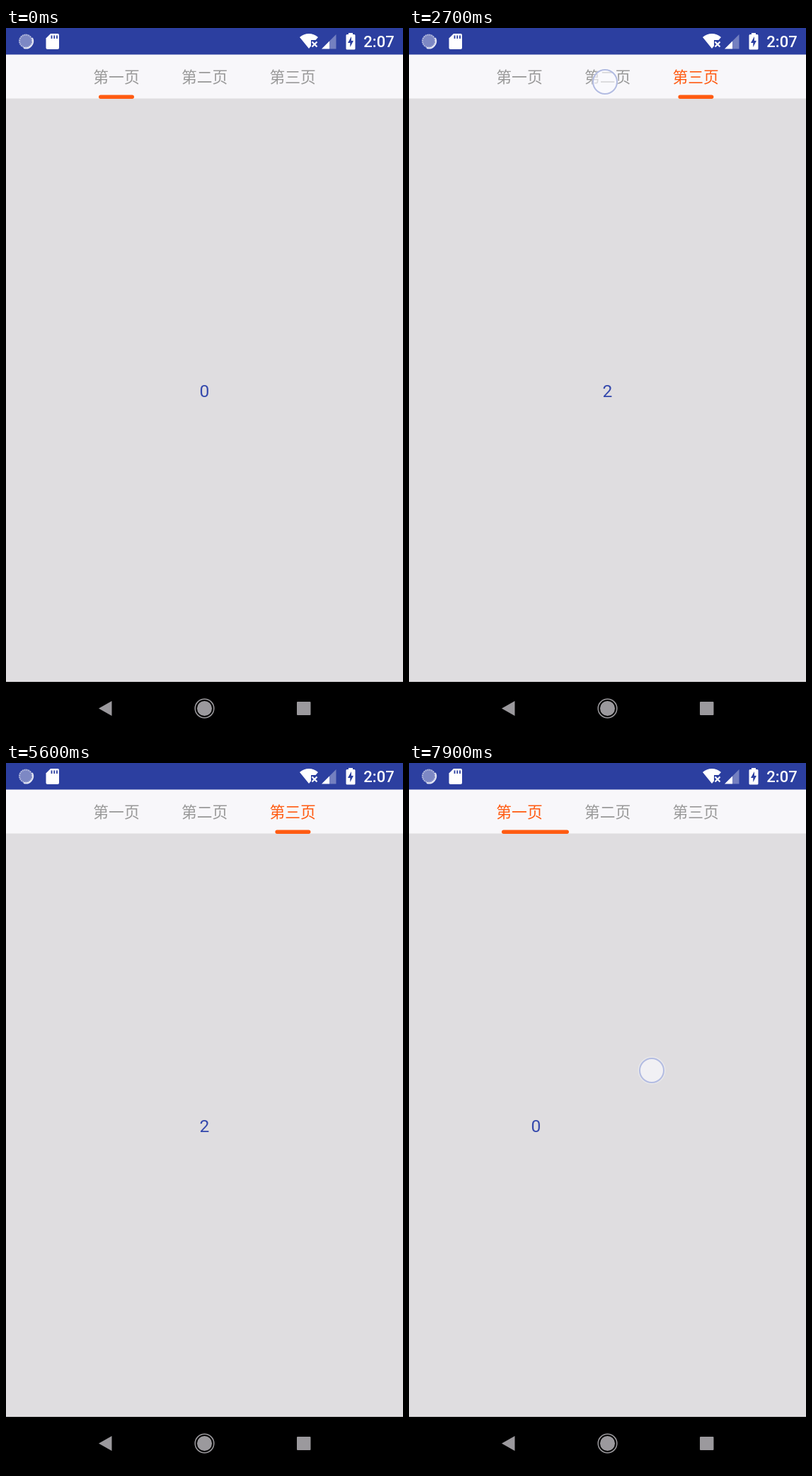
Animation, 561 px wide and 998 px high, one loop 8000 ms. Source, as an HTML page:

```html
<!DOCTYPE html>
<html lang="zh-CN">
<head>
<meta charset="utf-8">
<style>
  html, body { margin: 0; width: 100%; height: 100%; overflow: hidden; background: #dfdde0; }
  svg { display: block; width: 561px; height: 998px; }
  text { text-anchor: middle; }
  .tab { font: 21.8px "Noto Sans CJK SC", "Noto Sans CJK", sans-serif; fill: #999; }
  .tab.on { fill: #ff5b12; }
  .page { font: 24.6px Roboto, sans-serif; fill: #3549ad; }
  .clock { font: 500 22px Roboto, sans-serif; fill: #fff; }
</style>
</head>
<body>
<svg viewBox="0 0 561 998">
  <rect width="561" height="998" fill="#dfdde0"/>
  <g id="pages">
    <text class="page" x="280.5" y="521">0</text>
    <text class="page" x="841.5" y="521">1</text>
    <text class="page" x="1402.5" y="521">2</text>
  </g>

  <rect y="37" width="561" height="62.5" fill="#f8f7fa"/>
  <text class="tab" x="156" y="77">第一页</text>
  <text class="tab" x="280.7" y="77">第二页</text>
  <text class="tab" x="405.2" y="77">第三页</text>
  <rect id="bar" y="94.5" height="5.5" rx="2.75" fill="#ff5b12"/>

  <rect width="561" height="37.5" fill="#2c3fa0"/>
  <circle cx="28" cy="18.5" r="10" fill="#7d88c4"/>
  <circle cx="28" cy="18.5" r="8.8" fill="none" stroke="#c3c8e4" stroke-width="1.8" stroke-dasharray="1.2 1.6"/>
  <path d="M37 14A10 10 0 0 1 25 28" fill="none" stroke="#e4e7f4" stroke-width="2"/>
  <g fill="#fff">
    <path d="M63 8H73Q75 8 75 10V28Q75 30 73 30H58.5Q56.500 30 56.500 28V14.500Z"/>
    <path d="M428 29L415 13Q421 8 428 8T441 13L437.500 17H431V25.500Z"/>
    <path d="M446 29.500L457 18.500V29.500Z"/>
    <path d="M484 9V7H490V9H492Q493.500 9 493.500 10.500V29Q493.500 30.500 492 30.500H482Q480.500 30.500 480.500 29V10.500Q480.500 9 482 9Z"/>
  </g>
  <path d="M457 18.500L466.500 9V29.500H457Z" fill="#7480c0"/>
  <path d="M64.500 10.500V15M68.300 10.500V15M72 10.500V15" stroke="#2c3fa0" stroke-width="1.800"/>
  <path d="M432.500 19.500L439.500 26.500M439.500 19.500L432.500 26.500" stroke="#fff" stroke-width="2.200"/>
  <path d="M488 12L483 21H486.300V27L491 18H488Z" fill="#2c3fa0"/>
  <text class="clock" x="527" y="27">2:07</text>

  <rect y="923" width="561" height="75"/>
  <g fill="#9b999d">
    <path d="M131 960.500L149.500 950V971Z"/>
    <circle cx="280.500" cy="960.500" r="10.500"/>
    <circle cx="280.500" cy="960.500" r="13.300" fill="none" stroke="#9b999d" stroke-width="1.500"/>
    <rect x="411" y="951" width="19.500" height="19" rx="1"/>
  </g>

  <g id="touch">
    <circle r="18.500" fill="none" stroke="#fff" stroke-opacity=".3" stroke-width="2"/>
    <circle r="17" fill="#fbfaff" fill-opacity=".65" stroke="#b3bce2" stroke-width="2"/>
  </g>
</svg>
<script>
const LOOP = 8000, STEP = 100, PAGE = 561, TAB = 124.7, BAR_X = 131, BAR_W = 50;
const SCROLL_DELAY = 15, BAR_MS = 300, FADE_MS = 210;

const taps = [
  { down: 500, up: 622, from: 0, to: 1, x: 280, y: 75 },
  { down: 1500, up: 1655, from: 1, to: 2, x: 394, y: 82 },
  { down: 2700, up: 2822, from: 2, to: 1, x: 277, y: 76 },
  { down: 3700, up: 3755, from: 1, to: 0, x: 157, y: 69 },
  { down: 5000, up: 5182, from: 0, to: 2, x: 423, y: 74.5 },
  { down: 6500, up: 6611, from: 2, to: 0, x: 178, y: 75 },
];
const DRAG_START = 7600;

const pages = document.getElementById('pages');
const bar = document.getElementById('bar');
const touch = document.getElementById('touch');
const tabs = document.querySelectorAll('.tab');

const clamp = v => Math.min(1, Math.max(0, v));
const lerp = (a, b, k) => a + (b - a) * k;
const quintOut = k => 1 - (1 - k) ** 5;

// cubic-bezier(.4, 0, .2, 1), solved by bisection
function fastOutSlowIn(k) {
  let lo = 0, hi = 1;
  for (let i = 0; i < 20; i++) {
    const s = (lo + hi) / 2, r = 1 - s;
    if (1.2 * r * r * s + 0.6 * r * s * s + s ** 3 < k) lo = s; else hi = s;
  }
  return 3 * lo * lo - 2 * lo ** 3;
}

function showTouch(x, y, opacity) {
  touch.setAttribute('transform', `translate(${x} ${y})`);
  touch.setAttribute('opacity', opacity);
}

function render(t) {
  const tap = taps.findLast(a => t >= a.up);
  const pressed = taps.findLast(a => t >= a.down);
  let page = 0, left = 0, right = 0;

  if (tap) {
    const scrollMs = (Math.abs(tap.to - tap.from) + 1) * 100;
    page = lerp(tap.from, tap.to, quintOut(clamp((t - tap.up - SCROLL_DELAY) / scrollMs)));
    left = right = lerp(tap.from, tap.to, fastOutSlowIn(clamp((t - tap.up) / BAR_MS)));
  }

  if (t >= DRAG_START) {
    const k = (t - DRAG_START) / 300;
    page = 0.18 * clamp((k - 0.2) / 0.8) ** 1.5;
    // while dragging, the leading edge runs ahead of the trailing one
    left = clamp(page * 2 - 1);
    right = clamp(page * 2);
    showTouch(507 - 164 * k ** 1.5, 446 - 12 * k, 1);
  } else if (pressed) {
    showTouch(pressed.x, pressed.y, 1 - clamp((t - pressed.up) / FADE_MS));
  } else {
    showTouch(0, 0, 0);
  }

  pages.setAttribute('transform', `translate(${-page * PAGE} 0)`);
  bar.setAttribute('x', BAR_X + left * TAB);
  bar.setAttribute('width', BAR_W + (right - left) * TAB);
  tabs.forEach((tab, i) => tab.classList.toggle('on', !!tap && tap.to === i));
}

const begin = performance.now();
function tick() {
  const t = (performance.now() - begin) % LOOP;
  render(Math.floor(t / STEP) * STEP);
  requestAnimationFrame(tick);
}
tick();
</script>
</body>
</html>
```
